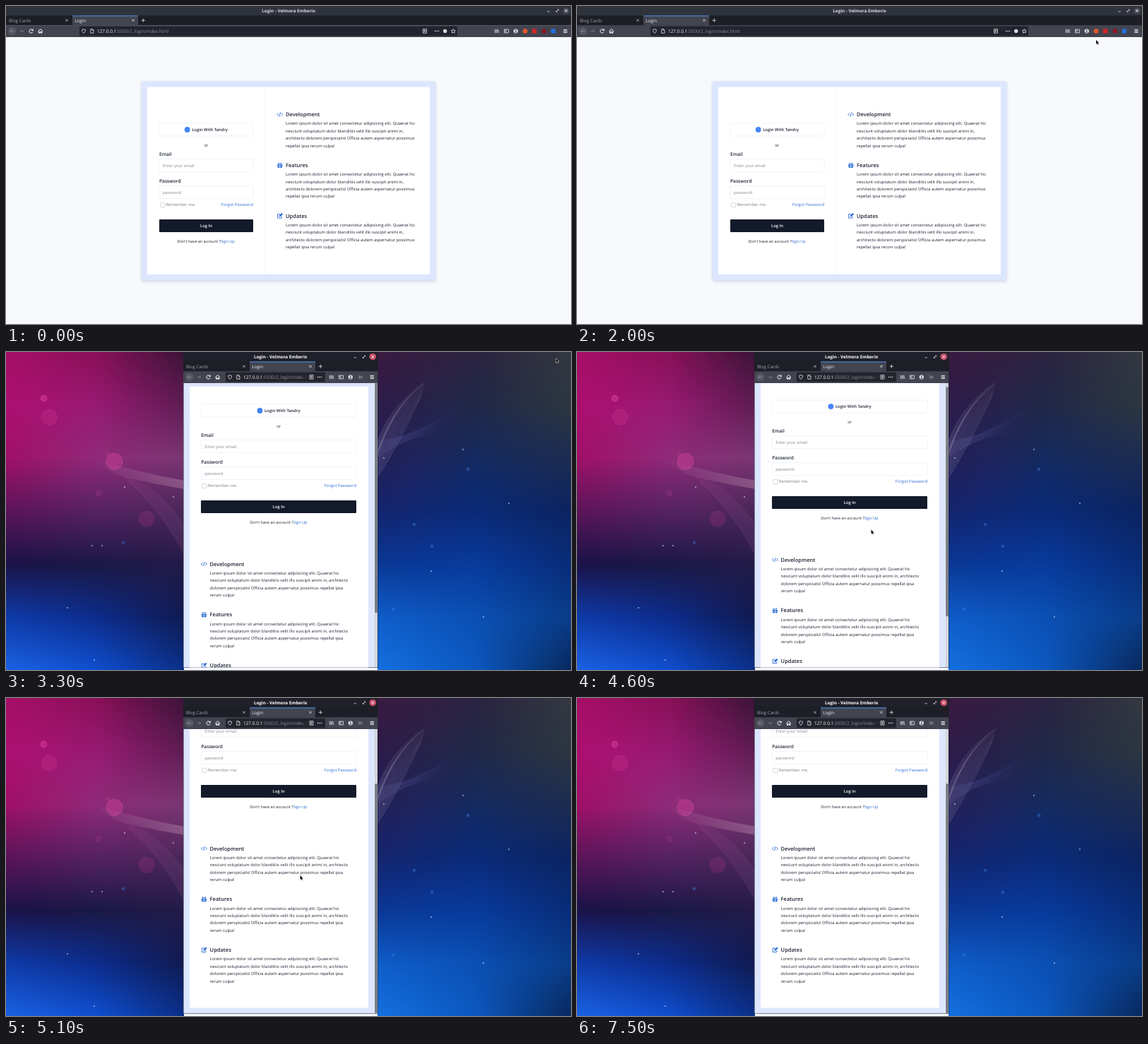
Recreate the animation shown at these times as an HTML page with a canvas. Size 800 by 450 pixels, loop 8000 ms.

```html
<!DOCTYPE html>
<html lang="en">
<head>
<meta charset="utf-8">
<title>Login</title>
<style>
  html, body { margin: 0; width: 100%; height: 100%; overflow: hidden; background: #f7f9fd; }
  canvas { display: block; width: 800px; height: 450px; }
</style>
</head>
<body>
<canvas></canvas>
<script>
const canvas = document.querySelector('canvas');
const g = canvas.getContext('2d');
const dpr = window.devicePixelRatio || 1;
canvas.width = 800 * dpr;
canvas.height = 450 * dpr;

const LOOP = 8000, STEP = 100;
const INK = '#1c2333', BLUE = '#2a6bd6', PALE = '#dce6fe', LIGHT = '#e8e8ee';
const BODY = 5.83;

const ICONS = {
  code: 'M-2-2L-4 0L-2 2M2-2L4 0L2 2M.8-3L-.8 3',
  gift: 'M-3.8-1h3.5v2h-3.5zM.3-1h3.5v2h-3.5zM-3.3 1.5h3v2h-3zM.3 1.5h3v2h-3zM0-1.2C-3.4-1.2-3-3.6-1.6-3.4Q-.6-3.2 0-1.2Q.6-3.2 1.6-3.4C3-3.6 3.4-1.2 0-1.2z',
  edit: 'M.6-2.4h-3.8v5.6h5.6v-2.4',
  pencil: 'M-1.2 1.4l.3-1.8L2.6-3.8L4.2-2.2L.7 1.2z',
  cross: 'M-1.7-1.7L1.7 1.7M1.7-1.7L-1.7 1.7',
  plus: 'M-2.6 0h5.2M0-2.6v5.2',
  dash: 'M-1.6 1.2h3.2',
  resize: 'M-1.7 1.7L1.7-1.7M.2-1.7h1.5v1.5M-1.7.2v1.5h1.5',
  back: 'M2.6 0h-5.2M-.4-2.2L-2.6 0L-.4 2.2',
  forward: 'M-2.6 0h5.2M.4-2.2L2.6 0L.4 2.2',
  reload: 'M2.3-1.3A2.6 2.6 0 1 0 2.5 1M2.8-2.9v2h-2',
  home: 'M-3.2.2L0-2.8L3.2.2M-2.2 0v2.8h1.5v-1.8h1.4v1.8h1.5v-2.8',
  shield: 'M0-2.8L2.4-2C2.4.6 1.6 2 0 2.9C-1.6 2-2.4.6-2.4-2z',
  file: 'M-2-2.8h2.6L2.2-1.2v4h-4.2zM.5-2.8v1.7h1.7',
  reader: 'M-2.5-2.8h5v5.6h-5zM-1.3-1.2h2.6M-1.3 0h2.6M-1.3 1.2h1.6',
  star: 'M0-3L.9-1L3-.8L1.4.6L1.9 2.8L0 1.6L-1.9 2.8L-1.4.6L-3-.8L-.9-1z',
  library: 'M-2.7-2.6v5.2M-1-2.6v5.2M.6-2.6v5.2M1.7-2.4L3 2.6',
  sidebar: 'M-3-2.4h6v4.8h-6zM-.6-2.4v4.8M-2.2-1h.8M-2.2.2h.8',
  menu: 'M-2.6-2h5.2M-2.6 0h5.2M-2.6 2h5.2',
  more: 'M-2.2-2L-.2 0L-2.2 2M.6-2L2.6 0L.6 2',
  cursor: 'M0 0v6l1.4-1.2l1 2.1l1-.5l-1-2h1.9z'
};
for (const name in ICONS) ICONS[name] = new Path2D(ICONS[name]);

const LOREM = 'Lorem ipsum dolor sit amet consectetur adipisicing elit. Quaerat hic';
const WIDE = [LOREM,
  'nesciunt voluptatum dolor blanditiis velit illo suscipit animi in,',
  'architecto dolorem perspiciatis! Officia autem aspernatur possimus',
  'repellat ipsa rerum culpa!'];
const NARROW = [LOREM,
  'nesciunt voluptatum dolor blanditiis velit illo suscipit animi in, architecto',
  'dolorem perspiciatis! Officia autem aspernatur possimus repellat ipsa',
  'rerum culpa!'];

// Pointer path: time, x, y
const PATH = [
  [700, 577, 208], [1200, 437, 172], [1300, 437, 172], [2000, 735, 48],
  [2200, 759, 34], [2700, 778.5, 9], [3500, 778.5, 9], [4300, 416.5, 251.5],
  [6100, 416.5, 250.5], [6200, 416.5, 250.5], [6700, 515, 11], [6800, 515, 11], [7500, -9, 453]
];

function rect(x, y, w, h, fill, r = 0) {
  g.fillStyle = fill;
  g.beginPath();
  g.roundRect(x, y, w, h, r);
  g.fill();
}

function frame(x, y, w, h, color, r = 1) {
  g.strokeStyle = color;
  g.lineWidth = .5;
  g.beginPath();
  g.roundRect(x, y, w, h, r);
  g.stroke();
}

function disc(x, y, r, fill) {
  g.fillStyle = fill;
  g.beginPath();
  g.arc(x, y, r, 0, 7);
  g.fill();
}

// y is the middle of the capitals
function text(s, x, y, { size = BODY, color = INK, weight = 400, align = 'left' } = {}) {
  g.font = `${weight} ${size}px "Open Sans", "Noto Sans", sans-serif`;
  g.textRendering = 'geometricPrecision';
  g.fillStyle = color;
  g.textAlign = align;
  g.fillText(s, x, y + size * .36);
  return g.measureText(s).width;
}

function icon(name, x, y, color = LIGHT, { fill = false, width = .8 } = {}) {
  g.save();
  g.translate(x, y);
  g.fillStyle = g.strokeStyle = color;
  g.lineWidth = width;
  fill ? g.fill(ICONS[name]) : g.stroke(ICONS[name]);
  g.restore();
}

function clip(x, y, w, h, draw) {
  g.save();
  g.beginPath();
  g.rect(x, y, w, h);
  g.clip();
  draw();
  g.restore();
}

function vertical(colors) {
  const fade = g.createLinearGradient(0, 0, 0, 450);
  colors.split(' ').forEach((c, i, all) => fade.addColorStop(i / (all.length - 1), '#' + c));
  return fade;
}

// Vertical gradients that melt into each other from left to right
const LEFT_SKY = [
  'a50f66 ad0f70 a01068 5c1458 1a1248 0f3aa8 1a62e4',
  '8a0f58 981a72 8f2a78 562262 1a1844 0c2c8c 0f4fd0',
  '3a1438 5e1c52 7a3672 4a2758 231a48 101a50 0a2f88'].map(vertical);
const RIGHT_SKY = [
  '3a1a40 2c1c4a 241f58 14246e 0a3796 0f5cc8 1470e0',
  '2a2240 202848 142a60 0a2a78 083a9c 0a50b4 0c58c0',
  '333840 2c3640 1c2c50 0c2360 082c78 0a3c88 08285c'].map(vertical);

function sky(x, w, [a, b, c]) {
  for (let i = 0; i < w; i += 2) {
    const u = i / w * 2, right = u >= 1;
    g.fillStyle = right ? b : a;
    g.fillRect(x + i, 0, 2, 450);
    g.globalAlpha = u % 1;
    g.fillStyle = right ? c : b;
    g.fillRect(x + i, 0, 2, 450);
    g.globalAlpha = 1;
  }
}

function strand(x0, y0, cx, cy, x1, y1, color, width = .6) {
  g.strokeStyle = color;
  g.lineWidth = width;
  g.beginPath();
  g.moveTo(x0, y0);
  g.quadraticCurveTo(cx, cy, x1, y1);
  g.stroke();
}

// A strand that brightens towards its start or end
function glint(x0, x1, rgb, alpha) {
  const fade = g.createLinearGradient(x0, 0, x1, 0);
  fade.addColorStop(0, `rgba(${rgb},0)`);
  fade.addColorStop(1, `rgba(${rgb},${alpha})`);
  return fade;
}

function wallpaper() {
  sky(0, 252, LEFT_SKY);
  sky(526, 274, RIGHT_SKY);

  const pink = glint(120, 250, '255,205,230', .32);
  const mauve = glint(150, 250, '190,110,180', .16);
  const pale = glint(604, 545, '225,220,235', .24);
  const blue = glint(650, 540, '130,140,225', .17);
  for (let i = 0; i < 12; i++) {
    strand(120 + i * 3, 150 + i * 2, 190, 172 + i, 256, 183 + i, pink, .8);
    strand(165 + i, 174 + i, 215 + i, 188 + i * 4, 256, 250 + i * 4, mauve, 1.4);
  }
  for (let i = 0; i < 14; i++) {
    strand(522, 140 + i * 3.4, 539 + i * 1.6, 78 + i * 3.6, 594 - i * .5, 42 + i * 1.6, pale, 1);
    strand(522, 126 + i * 2, 580, 124 - i, 650 - i * 3, 68 + i * 4, blue, .8);
  }
  strand(522, 158, 542, 82, 592, 44, pale, 2);

  for (const [x, y, r, a] of [[53.5, 65.5, 4.5, .4], [61, 92, 11, .18], [153.5, 155, 11.5, .32],
    [199, 236, 11, .15], [131, 200, 4, .12], [144, 144, 3, .12]]) {
    disc(x, y, r, `rgba(235,70,165,${a})`);
    g.strokeStyle = `rgba(245,120,190,${a})`;
    g.lineWidth = .7;
    g.stroke();
  }
  for (const [x, y] of [[237, 205], [122, 274], [136, 274], [87, 362], [125, 436], [712, 214],
    [647, 138], [602, 310], [676, 375], [535, 150], [168, 191]])
    disc(x, y, .9, 'rgba(205,225,255,.8)');
  for (const [x, y] of [[548, 364], [654, 166], [603, 275], [578, 244], [166, 270]])
    disc(x, y, 2.4, 'rgba(70,135,235,.35)');
}

function chrome(x0, x1, focused, wide) {
  const w = x1 - x0;
  rect(x0, 0, w, 14, focused ? '#1f2029' : '#2f333c');
  text('Login - Velmora Emberix', (x0 + x1) / 2, 6.7,
    { size: 6.25, weight: 700, color: focused ? '#fff' : '#d8dae0', align: 'center' });
  if (focused) {
    if (wide) disc(x1 - 19.3, 6.7, 4.8, '#4a4c58');
    disc(x1 - 7, 6.7, 4.8, '#c9506c');
  } else {
    disc(x1 - 7, 6.7, 4.5, '#484c56');
  }
  icon('dash', x1 - 32, 6.7);
  icon('resize', x1 - 19.3, 6.7);
  icon('cross', x1 - 7, 6.7, '#fff', { width: 1 });

  rect(x0, 13.5, w, 14, '#1d1e26');
  rect(x0 + 94, 13.5, 93, 14, '#424450');
  rect(x0 + 94, 13.5, 93, 1, '#4a90e2');
  text('Blog Cards', x0 + 4, 20.3, { size: 6.25, color: '#a5a7b0' });
  text('Login', x0 + 97.3, 20.3, { size: 6.25, color: '#f4f4f8' });
  icon('cross', x0 + 86, 20.3, '#c4c5cc');
  icon('cross', x0 + 180, 20.3);
  icon('plus', x0 + 194.3, 20.3);

  rect(x0, 27.2, w, 16.8, '#424450');
  disc(x0 + 8.6, 35.5, 5.8, '#565863');
  icon('back', x0 + 8.6, 35.5, '#8b8d97');
  icon('forward', x0 + 22, 35.5, '#7b7d88');
  icon('reload', x0 + 35.5, 35.5, '#fff', { width: 1 });
  icon('home', x0 + 48.7, 35.5, '#fff', { width: 1 });

  const left = wide ? 104 : 311, right = wide ? 639 : 452;
  rect(left, 28.8, right - left, 13.4, '#23242d', 1.5);
  icon('shield', left + 6, 35.5);
  icon('file', left + 17.8, 35.5);
  const end = wide ? 580 : 427;
  clip(left, 28, end - left, 15, () => {
    const host = text('127.0.0.1', left + 25, 35.5, { size: 6.45, color: '#fafafc' });
    text(':5500/2_login/index.html', left + 25 + host, 35.5, { size: 6.45, color: '#8f919b' });
    if (!wide) {
      const fade = g.createLinearGradient(end - 10, 0, end, 0);
      fade.addColorStop(0, '#23242d00');
      fade.addColorStop(1, '#23242d');
      rect(end - 10, 29, 10, 13, fade);
    }
  });
  const reader = wide ? 593 : 432.5, dots = wide ? 610 : 444;
  icon('reader', reader, 35.5);
  for (const d of [-2.5, 0, 2.5]) disc(dots + d, 35.5, .8, LIGHT);
  if (wide) {
    disc(621.7, 35.5, 2.7, '#d8d8df');
    icon('star', 633.3, 35.5);
  }
  const tools = wide ? 695 : 461;
  icon('library', tools, 35.5);
  icon('sidebar', tools + 13.5, 35.5);
  const user = tools + 26.8;
  disc(user, 35.5, 3.1, LIGHT);
  disc(user, 34.5, 1, '#424450');
  rect(user - 1.6, 36.2, 3.2, 1.3, '#424450', .6);
  if (wide) {
    disc(735, 35.5, 3.4, '#de5833');
    rect(744.8, 32.3, 6.4, 6.4, '#d02626');
    disc(761.7, 35.5, 3.2, '#8d1420');
    rect(771.8, 32.3, 6.4, 6.4, '#2470d8');
  } else {
    icon('more', 501.5, 35.5);
  }
  icon('menu', x1 - 8, 35.5, '#fff', { width: 1 });
}

function field(label, hint, x, y, w) {
  text(label, x, y, { size: 6.6, weight: 600 });
  frame(x, y + 6.7, w, 17.8, '#dfe7fa');
  text(hint, x + 5, y + 15.8, { color: '#85878d' });
}

function form(x, y, w) {
  const mid = x + w / 2;
  frame(x, y, w, 18, '#dfe7fa');
  disc(mid - 26.8, y + 9, 3.9, '#4285f4');
  text('Login With Tandry', mid - 20.3, y + 9, { weight: 600 });
  text('or', mid, y + 30.8, { align: 'center' });
  field('Email', 'Enter your email', x, y + 43.8, w);
  field('Password', 'password', x, y + 82, w);
  frame(x + 1.6, y + 112.6, 6.2, 6.2, '#aeb0b8');
  text('Remember me', x + 9.5, y + 115.2, { color: '#7d818c' });
  text('Forgot Password', x + w, y + 115.2, { color: BLUE, align: 'right' });
  rect(Math.floor(x), y + 136, Math.round(w), 18, '#131a2a', 1);
  text('Log In', mid, y + 145.2, { color: '#fff', weight: 600, align: 'center' });
  const ask = text("Don't have an account ?", mid - 41, y + 167, { size: 5.55 });
  text('Sign Up', mid - 41 + ask, y + 167, { size: 5.55, color: BLUE });
}

function sections(x, y, lines) {
  ['Development', 'Features', 'Updates'].forEach((title, i) => {
    const top = y + i * 71.7;
    const name = ['code', 'gift', 'edit'][i];
    icon(name, x, top, BLUE, { fill: name === 'gift', width: .9 });
    if (name === 'edit') icon('pencil', x, top, BLUE, { fill: true });
    text(title, x + 8.2, top, { size: 7.5, weight: 600 });
    lines.forEach((line, n) => text(line, x + 8.2, top + 12.8 + n * 10.45));
  });
}

function widePage() {
  rect(0, 44, 800, 406, '#f7f9fd');
  g.save();
  g.shadowColor = 'rgba(40,60,110,.22)';
  g.shadowBlur = 4 * dpr;
  g.shadowOffsetY = dpr;
  rect(192, 107, 416, 281.5, PALE, 1);
  g.restore();
  rect(200, 114.7, 400, 265, '#fff');
  rect(366.3, 114.7, .6, 265, '#eef1f8');
  form(217, 166, 133);
  sections(387.8, 153.5, WIDE);
}

function narrowPage(scroll) {
  rect(251, 0, 275.5, 447, '#1d1e26');
  clip(251.5, 44, 274.5, 402.5, () => {
    rect(251, 44, 271, 403, PALE);
    rect(260, 49 - scroll, 253, 476.5, '#fff');
    form(276.3, 74 - scroll, 219.9);
    sections(280.4, 300 - scroll, NARROW);
    rect(522, 44, 4, 403, '#d3d5db');
    rect(522.4, 44 + scroll * .885, 3.2, 325, '#70727b', 1.5);
  });
}

function pointer(t) {
  if (t < 800 || t >= 7500) return;
  const i = PATH.findIndex(p => p[0] > t);
  const [t0, x0, y0] = PATH[i - 1], [t1, x1, y1] = PATH[i];
  const u = (t - t0) / (t1 - t0), k = u * u * (3 - 2 * u);
  g.save();
  g.translate(x0 + (x1 - x0) * k, y0 + (y1 - y0) * k);
  g.fillStyle = '#111';
  g.strokeStyle = '#fff';
  g.lineWidth = .9;
  g.stroke(ICONS.cursor);
  g.fill(ICONS.cursor);
  g.restore();
}

function draw(t) {
  g.setTransform(dpr, 0, 0, dpr, 0, 0);
  if (t < 3300) {
    widePage();
    chrome(0, 800, t >= 3200, true);
  } else {
    const u = Math.min(1, Math.max(0, (t - 4500) / 600));
    wallpaper();
    narrowPage(87 * u ** 1.5);
    chrome(251, 526.3, true, false);
  }
  pointer(t);
}

const start = performance.now();
let last = -1;
function tick() {
  const t = Math.floor((performance.now() - start) % LOOP / STEP) * STEP;
  if (t !== last) draw(last = t);
  requestAnimationFrame(tick);
}
tick();
</script>
</body>
</html>
```
